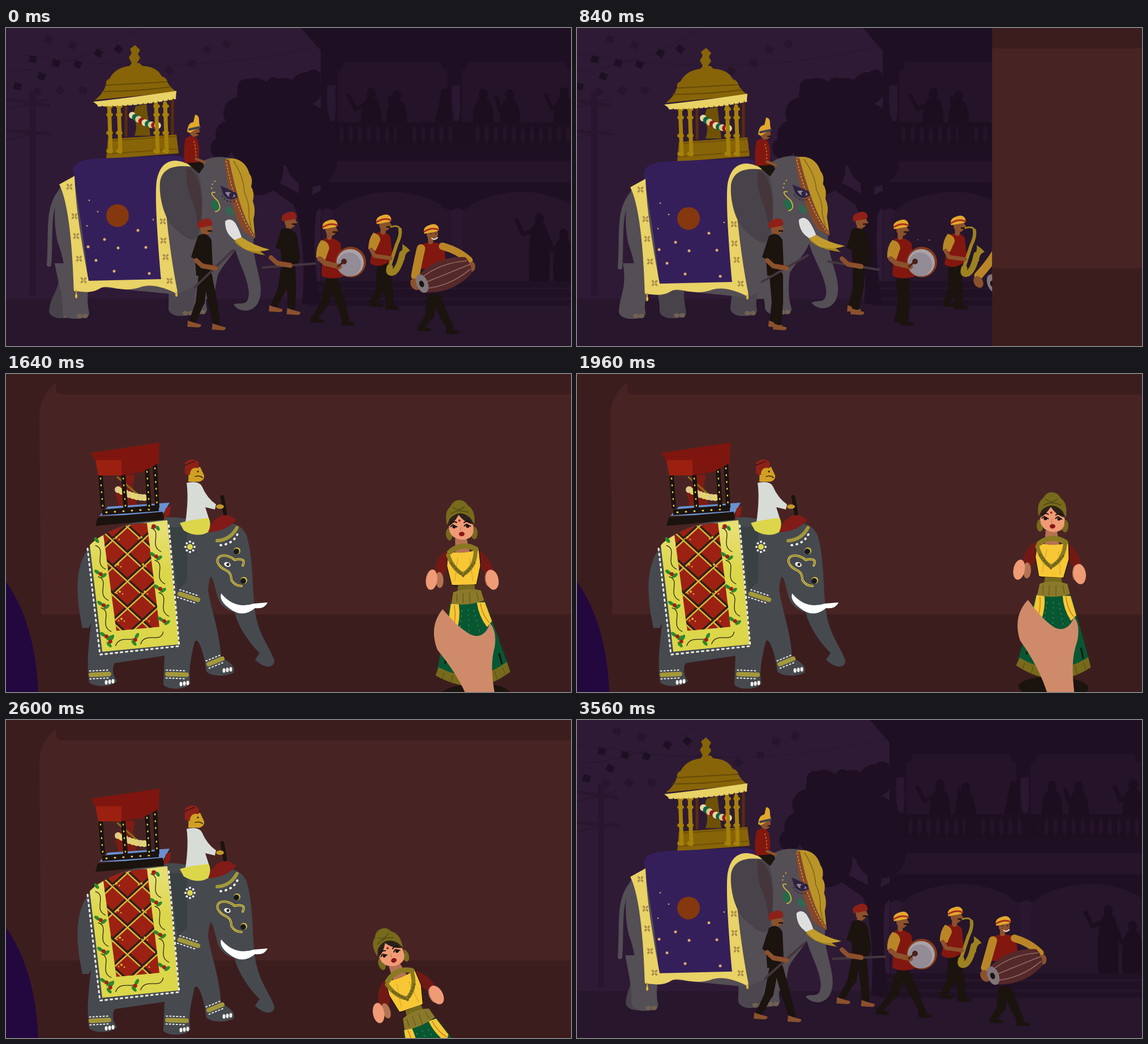
These frames come from a looping animation (998 by 561 pixels, 3.6 s). An HTML page with a canvas:

```html
<!DOCTYPE html>
<html lang="en">
<head>
<meta charset="utf-8">
<title>Procession and puppet</title>
<style>
html, body { margin: 0; width: 100%; height: 100%; overflow: hidden; background: #2e1a35; }
canvas { display: block; }
</style>
</head>
<body>
<canvas id="stage" width="998" height="561"></canvas>
<script>
const c = document.getElementById('stage').getContext('2d');
const { sin, cos, PI, min, max } = Math;
const clamp = v => max(0, min(1, v));

// Drawing helpers
const fill = (color, d) => { c.fillStyle = color; c.fill(new Path2D(d)); };
const line = (color, w, d, dash = []) => {
  c.strokeStyle = color; c.lineWidth = w; c.lineCap = c.lineJoin = 'round';
  c.setLineDash(dash); c.stroke(new Path2D(d));
};
const oval = (color, x, y, rx, ry = rx, deg = 0) => {
  c.fillStyle = color; c.beginPath(); c.ellipse(x, y, rx, ry, deg * PI / 180, 0, 7); c.fill();
};
const rect = (color, x, y, w, h) => { c.fillStyle = color; c.fillRect(x, y, w, h); };
const move = (dx, dy, draw) => { c.save(); c.translate(dx, dy); draw(); c.restore(); };
const turn = (x, y, deg, draw) => {
  c.save(); c.translate(x, y); c.rotate(deg * PI / 180); c.translate(-x, -y); draw(); c.restore();
};

const SKIN = '#8b512c', BLACK = '#1b130e', RED = '#82170f', AMBER = '#b98627', GOLD = '#876408', CREAM = '#e9d266';
const DARK = '#1f0f22';

function onlooker(x, y, h, arm) {
  const col = '#1c0d1f';
  oval(col, x, y, 8, 10);
  fill(col, `M${x - 7} ${y + 8}Q${x - 22} ${y + 18} ${x - 17} ${y + h}H${x + 17}Q${x + 22} ${y + 18} ${x + 7} ${y + 8}Z`);
  if (arm) line(col, 7, `M${x} ${y + 16}L${x + arm * 28} ${y + 28}L${x + arm * 40} ${y + 4}`);
}

function street() {
  line('#26152c', 1, 'M0 42Q300 95 560 30M0 78Q130 70 235 0');
  const flags = [[47, 55], [88, 62], [126, 64], [163, 44], [198, 37], [20, 103], [62, 85],
    [54, 112], [95, 110], [135, 110], [74, 20], [117, 30], [288, 75], [327, 62], [355, 38], [389, 28]];
  flags.forEach(([x, y], i) =>
    turn(x, y, 10 + i * 37 % 30, () => rect(i < 7 ? '#1e1023' : '#26152b', x - 6, y - 6, 13, 12)));
  rect('#27162d', 41, 112, 11, 360);
  line('#27162d', 5, 'M0 126L75 137M2 181L78 187');
  line('#27162d', 2, 'M0 145L75 125M0 198L75 180');
}

function tree() {
  for (const [x, y, r] of [[440, 120, 32], [490, 118, 30], [530, 107, 29], [412, 150, 28], [395, 188, 25],
    [380, 212, 19], [450, 190, 60], [520, 190, 60], [445, 250, 45], [540, 235, 45], [424, 105, 15], [473, 100, 13], [543, 86, 13]])
    oval(DARK, x, y, r);
  fill(DARK, 'M523 487C530 420 522 340 508 312L470 285L478 270L518 292L515 255H545L540 295L570 280L578 292L548 325C542 370 546 440 556 487Z');
}

function building() {
  fill(DARK, 'M521 0L556 40V478H1060V0Z');
  const inner = '#251429', light = '#2a1730';
  for (const x of [585, 805]) {
    fill(inner, `M${x} 207V75Q${x + 12} 75 ${x + 10} 60H${x + 185}Q${x + 183} 75 ${x + 195} 75V207Z`);
    fill(light, `M${x - 17} 101H${x - 2}Q${x - 5} 115 ${x - 2} 140L${x - 5} 164H${x - 14}Q${x - 20} 130 ${x - 17} 101Z`);
  }
  onlooker(645, 115, 85, -1); onlooker(690, 120, 75, -.3); onlooker(843, 117, 70);
  onlooker(890, 118, 80, -.6); onlooker(986, 114, 70, -.8);
  fill('#1c0d1f', 'M770 108L786 106L784 165L758 166Z');
  rect('#1d0e20', 560, 166, 500, 42);
  for (let x = 577; x < 1040; x += 16) oval(inner, x, 188, 4, 15);
  rect('#1d0e20', 690, 168, 28, 38); rect('#1d0e20', 795, 168, 25, 38);
  rect('#25142a', 565, 235, 495, 37);
  for (const x of [568, 798]) {
    fill('#26152b', `M${x} 447V324Q${x + 14} 322 ${x + 25} 310Q${x + 115} 268 ${x + 198} 310Q${x + 208} 323 ${x + 228} 323V447Z`);
    fill(light, `M${x - 13} 324Q${x} 312 ${x + 12} 324L${x + 8} 333V447H${x - 11}V333Z`);
  }
  onlooker(942, 336, 116, -1); onlooker(985, 364, 88, -.7);
  rect('#211125', 536, 447, 530, 43);
  rect('#27162c', 536, 458, 530, 3); rect('#27162c', 528, 476, 530, 3);
}

function elephantLeg(color, top, foot, y) {
  fill(color, `M${top - 32} 415C${top - 24} 460 ${foot - 24} 470 ${foot - 25} ${y - 8}Q${foot - 20} ${y + 4} ${foot} ${y + 3}Q${foot + 23} ${y + 3} ${foot + 22} ${y - 8}C${foot + 15} 470 ${top + 30} 450 ${top + 35} 415Z`);
  for (const dx of [5, 15]) oval('#706052', foot + dx, y - 2, 5, 4);
}

function howdah() {
  fill('#6f5105', 'M229 138L248 134L255 190H227Q235 165 222 160Z');
  for (const x of [212, 294]) line('#5a2c0c', 5, `M${x} 128V190`);
  for (let i = 0; i < 9; i++)
    oval(['#e6d9a2', '#0f6549', '#d8c98e', '#941c1a'][i % 4], 223 + i * 5.6, 154 + sin(i / 5) * 18, 6);
  fill(GOLD, 'M180 196L301 188L305 221L177 231Z');
  line('#6f5105', 2, 'M179 222L304 213M180 199L300 191');
  for (const x of [182, 199, 265, 281]) {
    line('#a58109', 7, `M${x} 133L${x + 3} 218`);
    for (const y of [138, 153, 185, 217]) oval('#a58109', x + 1, y, 6, 4);
  }
  fill(GOLD, 'M157 127Q172 116 177 99Q175 93 183 89Q193 70 218 67L222 62H236L241 67Q266 68 275 85Q284 88 285 95Q290 106 302 113Z');
  line('#654b06', 2, 'M177 101L284 95M170 112Q230 112 291 104');
  fill(CREAM, 'M154 130Q220 123 301 111L300 123Q235 137 163 137Z');
  line(CREAM, 3, 'M163 137Q235 137 299 124', [5, 4]);
  fill(GOLD, 'M223 64L217 52L222 44L219 37L228 30L237 39L233 46L237 53L230 64Z');
}

function rider() {
  fill(BLACK, 'M318 234L346 234L350 244L341 257L320 238Z');
  fill(RED, 'M317 195Q328 186 338 196Q344 215 339 237L315 238Q313 212 317 195Z');
  line(SKIN, 5, 'M336 231L351 237');
  line(AMBER, 1.5, 'M332 200Q336 213 335 227', [2, 4]);
  oval(SKIN, 333, 182, 9, 10);
  fill('#e1a82b', 'M320 183Q321 167 331 166L334 153Q341 153 341 163Q341 170 343 174L325 185Z');
  line('#44414d', 4, 'M324 179L342 175');
  line(BLACK, 2, 'M337 186H342');
}

function blanket() {
  fill('#351f5b', 'M118 250C122 235 140 231 170 230L295 225Q315 226 320 237C285 232 266 250 266 275C262 330 272 400 275 445L145 448C140 380 125 300 118 250Z');
  fill(CREAM, 'M94 276L121 261C124 330 136 390 146 446L274 443C270 400 262 300 266 270Q272 234 300 234Q320 236 328 246C300 240 284 250 278 266C282 330 290 400 303 466L300 468C270 453 250 452 235 458C200 468 180 450 165 460C150 469 135 465 120 464C118 400 112 310 94 276Z');
  for (const [x, y] of [[112, 280], [121, 332], [124, 367], [129, 407], [137, 445], [289, 446], [282, 404], [278, 375], [277, 341]])
    for (let a = 45; a < 360; a += 90)
      oval('#a98d48', x + 4 * cos(a * PI / 180), y + 4 * sin(a * PI / 180), 2.8, 1.8, a);
  for (const [x, y] of [[174, 373], [145, 386], [198, 388], [247, 387], [159, 410], [191, 429], [253, 433], [233, 357]])
    oval('#d7ae68', x, y, 2.5);
  for (const [x, y] of [[147, 304], [162, 324], [143, 349], [260, 338]]) oval('#d7ae68', x, y, 1.3);
  oval('#85380d', 197, 331, 20);
  line('#c49b2d', 2, 'M124 463V475M301 466V472');
  oval('#dcb743', 124, 473, 2, 4); oval('#dcb743', 301, 470, 2, 4);
}

function elephantHead() {
  fill('#544e55', 'M330 250C350 222 398 222 412 240C425 275 432 320 438 366C432 400 452 440 450 465C448 506 412 504 402 488C413 482 428 494 429 468C428 440 408 410 403 382C380 372 362 360 345 382C330 340 345 290 330 250Z');
  fill('#bb9428', 'M388 231C405 227 424 234 430 257Q437 266 433 280Q440 290 436 306Q442 320 437 338L440 370L420 357C410 320 396 280 388 231Z');
  line('#8e701b', 2, 'M402 235Q420 262 421 290Q431 310 429 333L434 357');
  fill('#85472a', 'M386 232C390 275 402 335 420 359L439 372V364C420 340 405 285 394 232Z');
  line('#cda441', 1.5, 'M389 235Q404 318 437 367', [2, 4]);
  fill('#e0dfe0', 'M387 341Q396 333 405 344Q413 357 418 375Q407 379 400 371Q387 361 387 341Z');
  fill('#a88620', 'M403 376Q418 395 458 401Q436 382 415 374Z');
  fill('#c29d2e', 'M416 369Q438 384 466 391Q445 398 420 389L404 374Z');
  fill('#2d2140', 'M379 278Q394 285 407 291L409 299Q392 308 383 292Z');
  fill('#8d8296', 'M387 290Q397 287 406 297Q394 303 387 290Z');
  oval('#2d2140', 398, 295, 4);
  line('#2d2140', 2, 'M382 296Q389 310 407 305', [1, 5]);
  oval('#236b49', 370, 313, 7, 10, -25); oval('#326650', 395, 323, 9, 6, 50);
  line('#c5ae45', 2, 'M370 324Q383 321 374 305L367 298Q359 288 369 290');
  line('#c5ae45', 2, 'M363 283Q363 272 373 268', [1, 6]);
}

function elephant(k) {
  const grey = '#544e55', shade = '#48434a', bob = 5 * k;
  elephantLeg(shade, 125 + 35 * k, 101 + 70 * k, 509);
  elephantLeg(grey, 337 + 6 * k, 333 + 24 * k, 503);
  fill(grey, 'M335 320L412 372C408 396 386 412 374 436L366 478H300Z');
  elephantLeg(grey, 118 - 5 * k, 125 - 26 * k, 510);
  elephantLeg('#4c474e', 312 - 8 * k, 312 - 16 * k, 505);
  move(0, bob, () => {
    fill(grey, 'M100 275C82 295 84 350 92 380C104 410 103 440 112 452L300 470L370 440C385 400 390 300 350 240L280 235Z');
    line(grey, 8, 'M95 290C72 320 80 360 76 417');
    howdah(); blanket();
  });
  turn(345, 250, -3 * k, elephantHead);
  move(0, bob, () => {
    fill(shade, 'M272 272C276 245 300 241 330 245C352 262 349 330 340 365C332 384 315 368 300 355C280 340 270 300 272 272Z');
    fill('#44363a', 'M319 246Q350 255 345 345L339 350Q336 318 324 294Q317 270 319 246Z');
    rider();
  });
}

function legs(x, hip, mid, ground, spread, bare) {
  const h = spread / 2, knee = (hip + ground) / 2;
  for (const side of [-1, 1]) {
    const f = mid + side * h, y = ground - (side < 0 ? 5 : 0);
    const kx = (x + f) / 2 + 3;
    line(BLACK, 16, `M${x + side * 4} ${hip}L${kx} ${knee}`);
    fill(BLACK, `M${kx - 8} ${knee}L${f - 6} ${y - 6}H${f + 7}L${kx + 8} ${knee}Z`);
    fill(bare ? SKIN : BLACK, `M${f - 7} ${y - 9}Q${f} ${y - 6} ${f + 16} ${y - 2}Q${f + 18} ${y + 4} ${f + 8} ${y + 3}L${f - 8} ${y + 2}Z`);
  }
}

function head(x, y, turban, front) {
  line(SKIN, 9, `M${x - 1} ${y}V${y + 14}`);
  oval(SKIN, x + 2, y, 10, 12);
  if (!front) {
    fill(SKIN, `M${x + 10} ${y - 4}L${x + 15} ${y + 3}L${x + 9} ${y + 5}Z`);
    line(BLACK, 2.5, `M${x + 6} ${y + 5}H${x + 12}`);
  }
  fill(turban, `M${x - 12} ${y}Q${x - 16} ${y - 11} ${x - 4} ${y - 15}Q${x + 7} ${y - 20} ${x + 12} ${y - 13}Q${x + 16} ${y - 6} ${x + 10} ${y - 4}Z`);
}

function bandHead(x, y, front) {
  head(x, y, '#e3a82e', front);
  line('#a83119', 3, `M${x - 12} ${y - 4}Q${x + 2} ${y - 12} ${x + 13} ${y - 7}`);
}

function guide(stick, sx, sy, angle, reach, back, px, py, d) {
  head(px, py, '#8e2018');
  fill(BLACK, d);
  line('#85241a', 6, `M${sx - 24} ${sy - 6}L${sx + 2} ${sy - 2}`);
  turn(sx, sy, angle, () => line(stick, 4, `M${sx - back} ${sy}H${sx + reach}`));
  line(SKIN, 8, `M${sx - 32} ${sy - 14}L${sx - 21} ${sy - 4}L${sx + 2} ${sy}`);
}

function drummer(u, stride) {
  legs(576, 447, 573, 522, 78 * stride);
  fill(RED, 'M561 372Q578 366 591 380L597 438Q575 446 557 437Z');
  bandHead(572, 355);
  fill(AMBER, 'M557 374Q570 376 571 389L564 409L548 405Q547 385 557 374Z');
  oval('#84391b', 609, 413, 27); oval('#a9a2a8', 608, 414, 24); oval('#938b95', 606, 417, 21);
  line(SKIN, 9, 'M554 407L564 415L589 421');
  line('#4a211c', 3, 'M586 421L597 412'); oval('#4a211c', 597, 412, 5);
  const spark = clamp((850 - u) / 120);
  if (u > 630 && spark) {
    const tip = v => v * spark;
    line('#d5ccd6', 1, `M602 374l${tip(-2)} ${tip(-4)}l${tip(3)} 0l${tip(-3)} ${tip(-5)}M622 374l${tip(1)} ${tip(-5)}l${tip(2)} 1l${tip(3)} ${tip(-6)}`);
  }
}

function saxPlayer(k, stride) {
  const brass = '#9c8220';
  legs(667, 424, 664, 494, 18 + 14 * stride);
  move(6 * k, 2 * k, () => {
    fill(RED, 'M651 364Q667 354 679 368L683 407Q662 427 643 415Z');
    bandHead(667, 346);
    fill(AMBER, 'M649 361Q662 365 661 375L653 393L640 390Q640 372 649 361Z');
    line(brass, 3, 'M680 351Q692 347 696 354');
    line(brass, 6, 'M696 355Q698 366 690 382L677 422');
    line(brass, 11, 'M678 422Q674 434 684 431Q694 426 700 398');
    fill(brass, 'M694 402Q702 394 700 381Q708 386 714 393Q704 396 704 410Z');
    line(SKIN, 7, 'M645 391L651 402L679 406');
  });
}

function barrelPlayer(u, k) {
  legs(756, 477, 760, 537, 18 + 32 * cos(min(u, 850) * .0023));
  const d = 11 * k, hand = 723 - 14 * k;
  move(d, 0, () => {
    fill(RED, 'M729 384Q750 373 774 383L778 425H725Z');
    bandHead(751, 363, true);
    line('#eadfd4', 2, 'M752 371Q757 375 762 370'); oval(BLACK, 750, 363, 1); oval(BLACK, 759, 363, 1);
  });
  line(AMBER, 15, `M${733 + d} 389Q${728 + d / 2} 410 ${hand} 437`);
  line(AMBER, 13, `M${771 + d} 385Q800 393 818 ${410 + 8 * k}`);
  oval(SKIN, hand, 452 - 4 * k, 8, 11, -30); oval(SKIN, 823 + 3 * k, 421 + 11 * k, 6, 9);
  turn(775, 435, -22, () => {
    fill('#55282a', 'M731 419Q775 399 820 420Q827 436 819 451Q775 472 731 451Z');
    line('#8c6e65', 1.5, 'M731 426Q775 412 820 427M731 435H823M731 444Q775 458 820 443');
    oval('#81757b', 732, 435, 10, 17); oval(BLACK, 731, 435, 4, 6);
  });
}

function procession(u) {
  const k = sin(PI / 2 * min(1, u / 800)) ** 2;
  const stride = max(0, cos(.00266 * (u - 300)));
  rect('#2e1a35', 0, 0, 998, 561);
  rect('#27162c', 0, 478, 998, 83);
  move(-.019 * u, 0, () => { street(); building(); tree(); });
  elephant(k);
  legs(352, 437, 350, 530, 62 * stride, true);
  guide('#44363d', 368, 424, -44 + 14 * k, 46, 48, 351, 353, 'M339 367Q354 357 363 374L365 422L358 437H336L334 408L327 404Z');
  legs(499, 414, 488, 503, 45 * stride, true);
  guide('#44363d', 500, 419 + 2 * k, -4.4 + 13.4 * k, 46 - 13 * k, 46 + 11 * k, 500, 341, 'M486 355Q504 348 514 366L520 405L515 418H487L485 391L476 388Z');
  drummer(u, stride);
  saxPlayer(k, stride);
  barrelPlayer(u, k);
}

// Toy elephant
const TOY = '#464a4f', LEMON = '#dcd64b', OLIVE = '#a3983b';

function toyBlanket() {
  const sheen = c.createLinearGradient(0, 275, 0, 345);
  sheen.addColorStop(0, '#e7df72'); sheen.addColorStop(1, LEMON);
  fill(sheen, 'M148 302Q180 267 285 258L305 477L170 490Z');
  line('#f0efe5', 3, 'M144 308L166 495L306 480L287 262', [3, 6]);
  c.save();
  const centre = new Path2D('M172 284Q205 264 249 263L271 446L195 453Z');
  c.fillStyle = '#9c2113'; c.fill(centre); c.clip(centre);
  for (let i = -3; i < 6; i++) {
    const y = 216 + i * 48;
    for (const [col, w, o] of [['#302016', 4, 0], ['#d8b83c', 2.5, 4]])
      line(col, w, `M160 ${y + o}L280 ${y + 110 + o}M280 ${y - 10 + o}L160 ${y + 100 + o}`);
    for (const x of [192 + i * 3, 236 + i * 3]) {
      oval('#d8b83c', x, y + 24, 2); oval('#d8b83c', x - 5, y + 27, 1.3); oval('#d8b83c', x + 5, y + 28, 1.3);
    }
  }
  c.restore();
  const vine = (x, y, deg) => turn(x, y, deg, () => {
    line('#2b281c', 1.3, `M${x - 6} ${y - 23}C${x + 14} ${y - 15} ${x - 13} ${y + 8} ${x + 8} ${y + 20}`);
    oval('#2b8a2b', x - 7, y + 24, 6, 3, 40); oval('#2b8a2b', x + 4, y + 31, 6, 3, -30);
    oval('#a22216', x - 1, y + 28, 3.5);
  });
  for (let i = 0; i < 3; i++) { vine(166 + 5 * i, 325 + 55 * i, -5); vine(264 + 7 * i, 294 + 57 * i, -5); }
  vine(212, 468, 80); vine(256, 465, 80);
  oval('#2b8a2b', 160, 293, 6, 3, 50); oval('#a22216', 261, 269, 4); oval('#2b8a2b', 268, 272, 5, 3, 60);
}

function toyHowdah() {
  fill('#7e1b13', 'M211 178H228L224 196L232 236H200L194 212Z');
  line('#876b1b', 3, 'M197 182L232 212');
  for (let i = 0; i < 8; i++) oval(i % 3 ? '#e3d56d' : '#e1c98e', 198 + i * 6.6, 204 + 14 * sin(i / 4.5), 6);
  oval('#7e1b13', 207, 219, 5, 4);
  fill('#6a91d0', 'M165 250L180 234L289 227L277 248Z');
  fill('#8d1d14', 'M282 237L291 233L289 249L279 256Z');
  fill(BLACK, 'M162 253L277 243L279 257L158 268Z');
  fill(BLACK, 'M170 239L270 231V242L170 249Z');
  line('#e2d04c', 3, 'M177 244L266 238', [1, 14]);
  for (const [x, y] of [[167, 178], [207, 178], [249, 166], [263, 160]]) {
    line(BLACK, 8, `M${x} ${y}L${x + 4} 234`);
    line('#e2d04c', 2.5, `M${x} ${y + 6}L${x + 4} 234`, [1, 11]);
  }
  fill('#7e160f', 'M149 139L271 121L270 157L240 173L203 179L158 152Z');
  fill('#9b2010', 'M158 152H204V179H163Z');
}

function toyRider() {
  line(BLACK, 7, 'M382 217L387 246');
  fill('#d1a023', 'M323 165L343 164L350 179Q351 187 342 190H322Z');
  fill('#8e2118', 'M316 176V157Q328 145 341 156L340 166Q325 163 325 178Z');
  line(BLACK, 1.3, 'M334 181Q342 178 347 183M316 161L333 154'); oval(BLACK, 339, 172, 1.5);
  fill('#d7dcd7', 'M319 192Q340 187 346 198Q355 219 371 230L369 239L352 235L359 257L317 261Q323 219 319 192Z');
  oval('#c49728', 378, 234, 7, 4);
  fill(LEMON, 'M307 263Q325 257 358 254Q364 264 357 279Q337 290 314 276Z');
}

function toyElephant() {
  fill(TOY, 'M148 305C170 270 260 250 300 253C330 255 345 270 360 275C390 255 415 262 425 285C438 330 434 380 440 420C446 460 465 480 474 505C474 521 455 519 440 504L448 492C425 470 408 440 404 420C385 415 377 405 373 390C365 360 361 340 357 380C360 410 377 450 380 500C403 512 404 518 402 527C385 535 362 533 354 525C350 490 338 460 333 473C325 505 322 530 326 545C320 558 285 558 278 548L280 497L192 510C186 520 190 535 196 541C190 553 155 553 147 544C142 510 146 480 150 440L146 448H135C125 400 118 340 148 305Z');
  fill('#394143', 'M289 270H320V367Q307 376 303 385Z');
  toyBlanket(); toyHowdah();
  fill('#821b17', 'M356 277Q370 246 393 249L407 257Q388 279 356 279Z');
  toyRider();
  line(OLIVE, 6, 'M373 294Q396 293 408 271');
  line('#f4f4ee', 4, 'M379 302Q402 300 410 280', [1, 8]);
  const scroll = 'M418 338C425 325 411 326 404 328C392 317 370 317 374 333C382 350 398 342 398 363Q404 374 416 374';
  line('#dbc43e', 4, scroll);
  line(TOY, 1, scroll);
  for (const [x, y] of [[408, 312], [420, 364]]) { oval('#dbc43e', x, y, 6); oval('#171917', x - 1, y + 1, 5); }
  oval('#f4f2ea', 391, 336, 6, 4, 20); oval(BLACK, 392, 336, 2.5);
  for (let a = 0; a < 8; a++) oval('#f4f4ee', 325 + 8 * cos(a * PI / 4), 305 + 9 * sin(a * PI / 4), 2);
  oval(LEMON, 325, 305, 5);
  fill('#fff', 'M380 387Q404 416 438 405L462 403Q457 415 440 413Q417 432 394 413Q376 400 380 387Z');
  for (const [x, y, deg, r] of [[323, 393, 18, 17], [166, 530, -3, 16], [302, 530, 2, 17], [370, 507, -22, 13]])
    turn(x, y, deg, () => {
      line(OLIVE, 8, `M${x - r} ${y}H${x + r}`);
      line('#f4f4ee', 2, `M${x - r - 2} ${y - 7}H${x + r}M${x - r - 2} ${y + 7}H${x + r}`, [2, 4]);
    });
  for (const [x, y] of [[177, 544], [309, 547], [385, 523]])
    for (let i = 0; i < 3; i++) oval('#f4f4ee', x + i * 6, y - i, 2.5, 4);
}

function puppet() {
  const olive = '#776a1c', skin = '#ef9b76', gold = '#f7c735';
  oval(BLACK, 835, 550, 62, 19);
  fill('#075733', 'M800 387H862L900 511Q840 550 769 513Z');
  line(BLACK, 3, 'M793 468L786 492M882 480L886 497');
  fill(olive, 'M774 499Q837 535 895 495L900 513Q838 557 768 513Z');
  line('#514913', 1, 'M783 509L779 520M798 514L795 528M817 518V533M872 511L877 527M887 505L891 516');
  fill(gold, 'M801 388L815 389Q818 417 806 443L794 425ZM847 388H861L872 422L863 432Q849 412 847 388Z');
  line('#a46520', 1, 'M807 391Q810 420 800 434M853 390Q856 411 867 424');
  line('#54905e', 1.5, 'M820 401L814 440M831 400V440M841 402L849 438', [1, 8]);
  fill('#cf8b69', 'M786 397C765 420 766 447 774 469C801 505 816 535 826 565V720H873V565C865 510 868 490 875 467Q880 438 868 425C861 448 843 452 829 441C810 428 800 414 786 397Z');
  fill('#b47352', 'M814 273H834L839 300H813Z');
  fill('#721914', 'M803 293Q780 298 775 330L790 339L803 317ZM849 293Q870 302 879 331L865 338L850 318Z');
  oval('#b47352', 783, 345, 7, 14); oval('#b47352', 870, 347, 7, 14);
  oval(skin, 769, 344, 10, 18, 10); oval(skin, 876, 349, 11, 18, -10);
  fill(gold, 'M800 295Q825 303 855 294L856 325L848 356L804 355L797 321Z');
  line(BLACK, 1.2, 'M800 295L797 321L804 355Q826 361 848 356L857 322L855 294');
  line('#d79c28', 1, 'M817 307L810 348M838 310L842 350');
  line('#8a7921', 9, 'M803 297Q826 279 850 294');
  line('#8a7921', 7, 'M800 302Q808 328 825 337Q846 327 849 298');
  line('#6b601b', 4, 'M805 317L825 340L846 318', [1, 5]);
  fill(olive, 'M815 356H844L846 371L813 372Z');
  fill('#8b792a', 'M806 368Q830 359 855 367L860 385Q830 394 802 388Z');
  line('#5a5016', 1, 'M812 371V385M823 370V387M835 370V388M847 370L850 384');
  oval(olive, 804, 265, 6, 11); oval(olive, 848, 265, 6, 11);
  fill('#2b211a', 'M804 260Q802 229 824 228Q848 231 848 260Z');
  fill(skin, 'M804 251Q814 246 822 232Q832 247 847 250Q849 267 840 273Q827 280 812 271Q802 262 804 251Z');
  fill(olive, 'M801 249Q796 226 808 217Q814 205 824 206Q834 206 839 216Q853 225 849 250L843 239Q825 220 806 238Z');
  line('#5a5016', 2, 'M813 219Q823 227 833 218M809 229Q823 221 839 228');
  for (const x of [813, 837]) {
    line(BLACK, 2, `M${x - 6} ${252}L${x - 2} 249L${x + 5} 253M${x - 6} 246Q${x} 242 ${x + 5} 245`);
    oval(BLACK, x, 253, 3, 2.5);
  }
  oval('#a41c17', 823, 242, 2); oval('#8a1713', 826, 266, 5, 4);
  line('#b96e53', 1, 'M825 253L824 260');
}

// Keys: time, waist x, waist y, lean
const KEYS = [[980, 655, 720, -30], [1160, 726, 522, -20], [1520, 831, 372, 0], [1640, 815, 388, -2.7], [1880, 852, 370, 3]];

function puppetPose(u) {
  let i = 0;
  while (i < KEYS.length - 2 && u > KEYS[i + 1][0]) i++;
  const [a, b] = [KEYS[i], KEYS[i + 1]];
  const p = clamp((u - a[0]) / (b[0] - a[0])), e = i ? p * p * (3 - 2 * p) : p * (2 - p);
  return a.map((v, n) => v + (b[n] - v) * e);
}

function toyRoom(u) {
  rect('#3c1d1e', 0, 0, 998, 561);
  fill('#472423', 'M998 36H101C88 36 86 27 90 15C70 27 57 55 59 80L62 424H998Z');
  fill('#230840', 'M0 366Q52 440 57 561H0Z');
  toyElephant();
  const [, x, y, lean] = puppetPose(u);
  move(x - 831, y - 372, () => turn(831, 372, lean, puppet));
}

function frame(now) {
  const t = now % 3600, u = t < 1880 ? t : 3760 - t;
  const p = clamp((u - 629) / 588);
  const ease = p < .5 ? 2 * p * p : 1 - 2 * (1 - p) ** 2;
  const edge = max(0, 998 * (1 - 1.02 * ease));
  if (edge > 0) procession(u);
  if (edge < 998) {
    c.save();
    c.beginPath(); c.rect(edge, 0, 998, 561); c.clip();
    toyRoom(u);
    c.restore();
  }
  requestAnimationFrame(frame);
}
requestAnimationFrame(frame);
</script>
</body>
</html>
```
